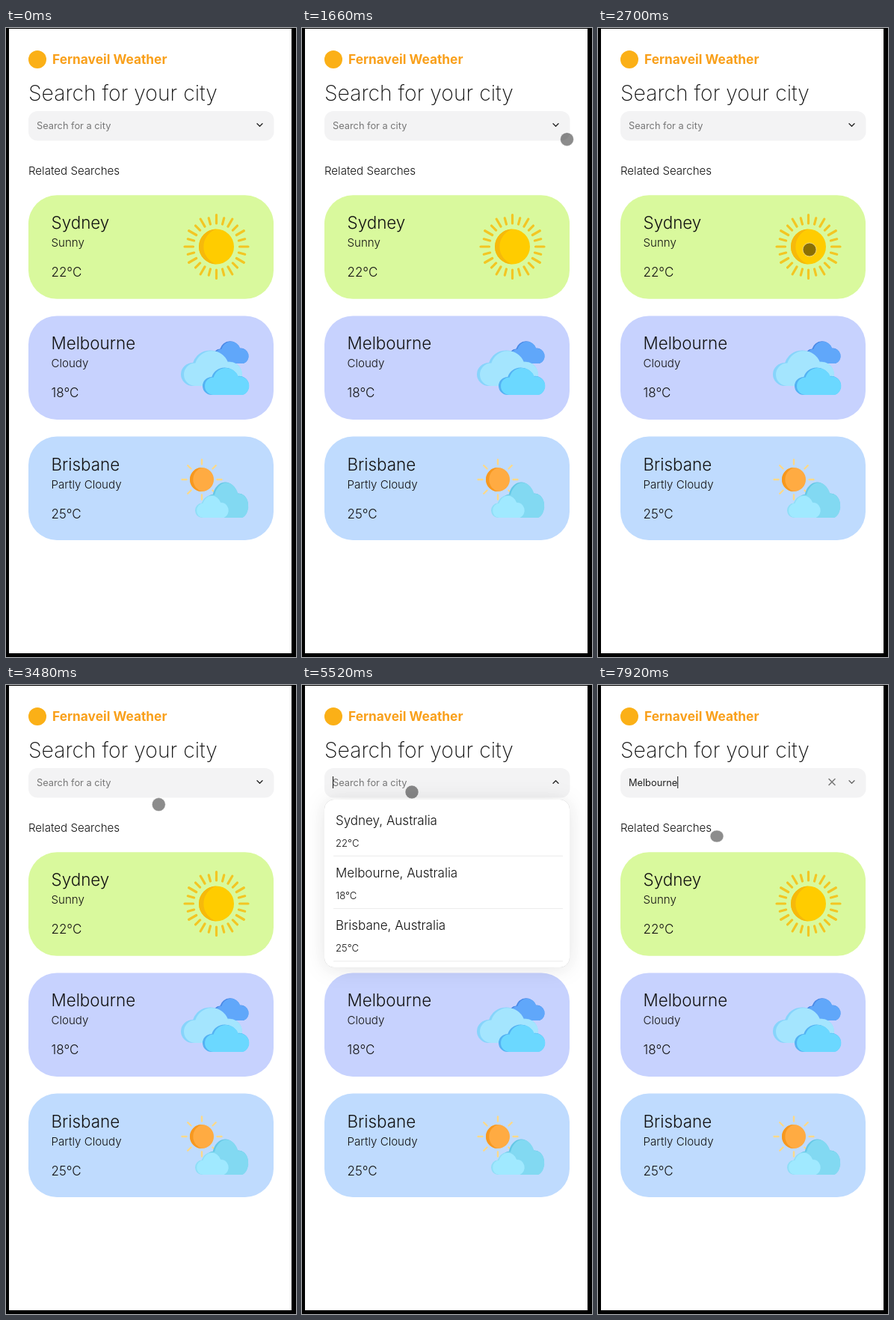
An HTML page that plays this animation: 388 px wide and 840 px high, repeating every 8000 ms.

```html
<!DOCTYPE html>
<html lang="en">
<head>
<meta charset="utf-8">
<title>Weather search</title>
<style>
  html, body { margin: 0; width: 100%; height: 100%; overflow: hidden; background: #000; }
  svg { display: block; width: 100%; height: 100%; }
  text { font-family: Inter, Roboto, sans-serif; font-weight: 300; fill: #111; white-space: pre; }
  .line { fill: none; stroke-linecap: round; stroke-linejoin: round; }
  #panel { filter: drop-shadow(0 2px 14px rgba(0,0,0,.09)) drop-shadow(0 0 .6px rgba(0,0,0,.3)); }
</style>
</head>
<body>
<svg id="stage" viewBox="0 0 388 840"></svg>
<script>
const XL = 28.3, L = 22.4, M = 17, S = 15.1, XS = 13.1;

const text = (x, y, size, str, extra = '') =>
  `<text x="${x}" y="${y}" font-size="${size}" ${extra}>${str}</text>`;

const disc = (x, y, r, fill) => `<circle cx="${x}" cy="${y}" r="${r}" fill="${fill}"/>`;

// A ring of rays; every second one reaches only to r3.
function rays(x, y, count, r1, r2, r3, width, color) {
  let d = '';
  for (let i = 0; i < count; i++) {
    const a = i * 2 * Math.PI / count, end = i % 2 ? r3 : r2;
    const c = Math.cos(a), s = Math.sin(a);
    d += `M${x + r1 * c} ${y + r1 * s}L${x + end * c} ${y + end * s}`;
  }
  return `<path class="line" d="${d}" stroke="${color}" stroke-width="${width}"/>`;
}

// Disc with a shaded crescent along its left side.
const orb = (x, y, r, light, dark) => disc(x, y, r, light) +
  `<path fill="${dark}" d="M${x} ${y - r}A${r} ${r} 0 0 0 ${x} ${y + r}
   A${r * 1.05} ${r * 1.05} 0 0 1 ${x} ${y - r}Z"/>`;

// Cloud of 65 x 37 units with a darker left edge.
function cloud(x, y, sx, sy, light, dark) {
  const d = 'M12 37A12 12 0 0 1 12 13A18 18 0 0 1 46 12A12.9 12.9 0 0 1 52 37Z';
  return `<g transform="translate(${x} ${y}) scale(${sx} ${sy})">
    <path d="${d}" fill="${dark}"/>
    <path d="${d}" fill="${light}" transform="translate(3 .6) scale(.955 .984)"/></g>`;
}

const sunny = rays(281.5, 292, 24, 31, 42.5, 39.5, 3.2, '#f3c623') +
  orb(281.5, 292, 23.5, '#ffcc00', '#f6b90b');
const cloudy = cloud(277, 418, .78, .81, '#60a7fa', '#4a88e6') +
  cloud(234, 430, 1.34, 1.3, '#a4e5fe', '#87d4fb') +
  cloud(263, 453, 1.02, 1, '#6bd8ff', '#54b2f3');
const partly = rays(262, 603, 8, 20.5, 26.5, 26.5, 2.4, '#fbd98a') +
  orb(262, 603, 16, '#ffab42', '#f7981f') +
  cloud(265, 606, .97, 1.3, '#82d9f2', '#66c8e6') +
  cloud(253, 624, .73, .81, '#a0e9ff', '#90def7');

const cities = [
  ['Sydney', 'Sunny', '22°C', '#d9f99d', sunny],
  ['Melbourne', 'Cloudy', '18°C', '#c7d2fe', cloudy],
  ['Brisbane', 'Partly Cloudy', '25°C', '#bfdbfe', partly],
];

const card = ([name, sky, temp, color, icon], i) => {
  const y = 223.3 + i * 161.1;
  return `<rect x="30" y="${y}" width="328" height="138.5" rx="38" fill="${color}"/>` +
    text(60.5, y + 45, L, name) + text(60.5, y + 69, S, sky) +
    text(60.5, y + 109, M, temp) + icon;
};

const row = ([name, , temp], i) => `<g id="row${i}">` +
  text(45, 186.5, M, name + ', Australia') + text(45, 215.5, XS, temp) +
  '<path d="M42 228.3H349" stroke="#ececec"/></g>';

const $ = id => document.getElementById(id);
$('stage').innerHTML = `
  <rect x="4" y="1" width="378" height="834" fill="#fff"/>
  ${disc(42, 42, 12, '#fbb017')}
  ${text(62, 47.8, 17.3, 'Fernaveil Weather', 'style="font-weight:700;fill:#f9a01b"')}
  ${text(30, 97, XL, 'Search for your city', 'style="font-weight:200"')}
  <rect x="30" y="111" width="328.5" height="39.5" rx="12" fill="#f3f3f4"/>
  ${text(41, 135, 12.8, '', 'id="field" style="font-weight:400"')}
  <path id="caret" d="M0 122V138" stroke="#111"/>
  <path id="clear" class="line" d="M309 125.500l8 8m0 -8l-8 8" stroke="#777" stroke-width="1.5"/>
  <path id="chevron" class="line" d="M-3.500 -1.700L0 1.800L3.500 -1.700" stroke-width="1.3"/>
  ${text(30, 195.5, S, 'Related Searches')}
  ${cities.map(card).join('')}
  <g id="menu">
    <rect id="panel" x="30" y="153" width="328" rx="13" fill="#fff"/>
    ${cities.map(row).join('')}
  </g>
  <ellipse id="dot" rx="9" fill="#000" fill-opacity=".45" stroke="#fff" stroke-opacity=".5"/>`;

// Pointer path: time, x, y
const path = [
  [980, 369, 64], [1230, 365, 77], [1470, 365, 77], [1870, 343, 227], [2030, 329, 258],
  [2220, 329, 258], [2430, 300, 288], [2570, 300, 288], [2690, 283, 296], [2810, 283, 296],
  [3080, 237, 225], [3230, 237, 225], [3660, 181, 113], [3820, 181, 113], [4040, 175, 122],
  [4150, 175, 122], [4550, 172, 127], [4650, 172, 127], [5010, 149, 142], [5510, 149, 142],
  [5520, 147, 143], [7370, 147, 143], [7540, 169, 201], [7680, 169, 201], [7910, 159, 202],
  [8000, 159, 202],
];

const within = (t, a, b) => t >= a && t < b;
const clamp = p => Math.min(1, Math.max(0, p));
const smooth = p => (p = clamp(p), p * p * (3 - 2 * p));
const show = (id, on) => $(id).setAttribute('visibility', on ? 'visible' : 'hidden');

function pointer(t) {
  const i = Math.max(1, path.findIndex(p => p[0] > t));
  const [t0, x0, y0] = path[i - 1], [t1, x1, y1] = path[i];
  const k = clamp((t - t0) / (t1 - t0));
  return [x0 + (x1 - x0) * k, y0 + (y1 - y0) * k];
}

// How far the menu is open: a damped spring in, an ease-out away.
function openness(t) {
  if (t < 3830) return 0;
  if (t >= 7680) return (1 - clamp((t - 7680) / 180)) ** 2;
  const w = (t - 3830) * .016;
  return 1 - (1 + w) * Math.exp(-w);
}

function typed(t) {
  if (t >= 7700) return 'Melbourne';
  return 'Mel'.slice(0, [6060, 6200, 6340].filter(k => t >= k).length);
}

function draw(t) {
  const value = typed(t), field = $('field');
  field.textContent = value || 'Search for a city';
  field.style.fill = value ? '#222' : '#777';
  const end = 41.5 + (value ? field.getComputedTextLength() : 0);
  $('caret').setAttribute('transform', `translate(${end} 0)`);
  show('caret', within(t, 4510, 5010) || within(t, 5520, 6930) || t >= 7430);
  show('clear', value);

  const turn = 180 * (smooth((t - 3830) / 330) - smooth((t - 7690) / 150));
  $('chevron').setAttribute('transform', `translate(339.500 129.500) rotate(${turn})`);
  $('chevron').setAttribute('stroke', value ? '#666' : '#222');

  const open = openness(t), scale = .85 + .15 * open;
  $('menu').setAttribute('transform',
    `translate(194 153) scale(${scale}) translate(-194 -153)`);
  $('menu').setAttribute('opacity', open);
  $('menu').style.display = open > 0 ? '' : 'none';
  let count = 0;
  cities.forEach(([name], i) => {
    const match = !value || name.startsWith(value);
    $('row' + i).style.display = match ? '' : 'none';
    if (match) $('row' + i).setAttribute('transform', `translate(0 ${70.3 * count++})`);
  });
  $('panel').setAttribute('height', 13.1 + 70.3 * count);

  const [x, y] = pointer(t), dot = $('dot');
  dot.setAttribute('cx', x);
  dot.setAttribute('cy', y);
  dot.setAttribute('ry', within(t, 3950, 4150) || t >= 7680 ? 8 : 9);
  show('dot', t >= 980 && !within(t, 6060, 7220));
}

const start = performance.now();
function tick() {
  draw((performance.now() - start) % 8000);
  requestAnimationFrame(tick);
}
tick();
</script>
</body>
</html>
```
